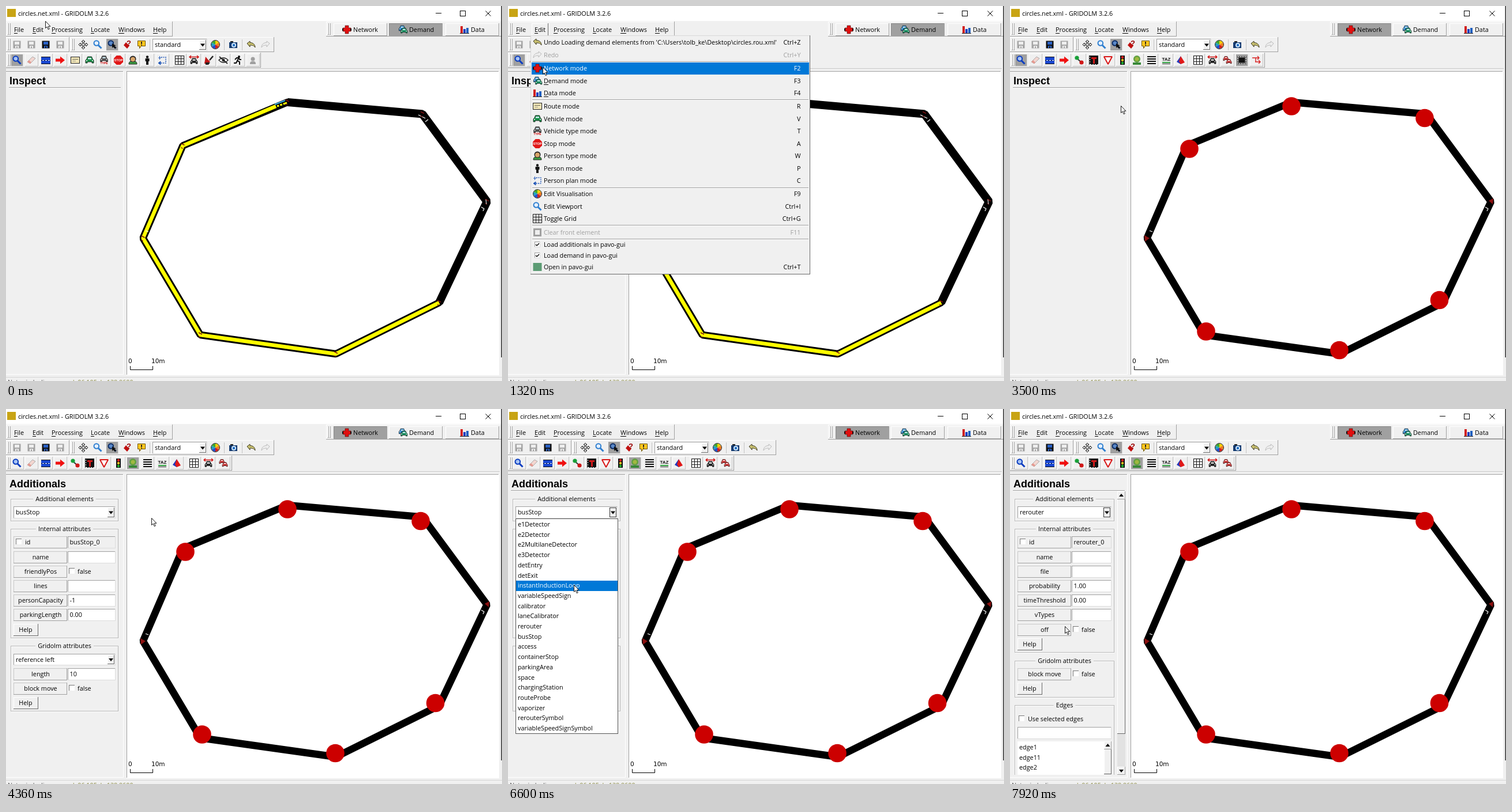
Write an HTML page with a canvas that moves like this. It is 860 px wide and 651 px high and loops after 8 s.

```html
<!DOCTYPE html>
<html lang="en">
<head>
<meta charset="utf-8">
<title>Road editor</title>
<style>
html, body { margin: 0; width: 100%; height: 100%; overflow: hidden; background: #f0f0f0; }
canvas { display: block; }
</style>
</head>
<body>
<canvas id="stage" width="860" height="651"></canvas>
<script>
const g = document.getElementById('stage').getContext('2d');
const FACE = '#f0f0f0', SHADE = '#a0a0a0', BLUE = '#0078d7', RED = '#cc0000';
const UI = '10.8px "Open Sans", "Noto Sans", sans-serif';
const HEAD = 'bold 18px "Liberation Sans", Arial, sans-serif';
const TINY = 'bold 5.5px "Liberation Sans", Arial, sans-serif';

// Drawing helpers
function rect(x, y, w, h, c) { g.fillStyle = c; g.fillRect(x, y, w, h); }
function box(x, y, w, h, light, dark, fill) {
  if (fill) rect(x, y, w, h, fill);
  rect(x, y, w, 1, light); rect(x, y, 1, h, light);
  rect(x, y + h - 1, w, 1, dark); rect(x + w - 1, y, 1, h, dark);
}
const raised = (x, y, w, h, fill = FACE) => box(x, y, w, h, '#fff', SHADE, fill);
const sunken = (x, y, w, h, fill = '#fff') => box(x, y, w, h, SHADE, '#dcdcdc', fill);
function path(d, fill, stroke, width = 1) {
  const p = new Path2D(d);
  if (fill) { g.fillStyle = fill; g.fill(p); }
  if (stroke) { g.strokeStyle = stroke; g.lineWidth = width; g.stroke(p); }
}
function dot(x, y, r, c) { g.fillStyle = c; g.beginPath(); g.arc(x, y, r, 0, 7); g.fill(); }
function text(s, x, y, c = '#000', align = 'left', font = UI) {
  g.font = font; g.fillStyle = c; g.textAlign = align; g.fillText(s, x, y);
}
function hotText(s, x, y, c = '#000') {
  text(s, x, y, c);
  rect(x, y + 2, Math.round(g.measureText(s[0]).width), 1, c);
}
function line(points, c, width, closed) {
  g.beginPath();
  points.forEach(p => g.lineTo(...p));
  if (closed) g.closePath();
  g.strokeStyle = c; g.lineWidth = width; g.stroke();
}

// Icons, each centred on 0,0
function disk(c, inner) {
  path('M-6.5-6.5h13v13h-13z', c);
  rect(-4, -5, 8, 5, inner); rect(-3, 2, 6, 4, inner); rect(-1, 3, 2, 3, c);
}
function lens(c, glass = '#e4f0ff') {
  path('M1 1L6.500 6.500', 0, c, 3);
  path('M-6.500-2.500a4.300 4.300 0 1 0 8.600 0a4.300 4.300 0 1 0-8.600 0', glass, c, 2);
}
function car(c, glass = '#cfe8f0') {
  path('M-7 5V0l2-2 1.5-4h7L5-2l2 2v5h-3V3h-8v2z', c, '#111', .8);
  rect(-3, -4, 6, 2.5, glass); rect(-6, 0, 2, 1.5, '#fff'); rect(4, 0, 2, 1.5, '#fff');
}
function bentArrow(c, edge) { path('M-7-2l5-4v2.5c6 0 9 4 9 8.500c-2-3-4-4-9-4v3z', c, edge); }
function man(c) {
  dot(0, -5.5, 2.2, c);
  path('M-3.500-3h7v5h-1.500v6h-4v-6h-1.500z', c);
}
const icons = {
  saveOff() { disk('#a5a5a5', '#eee'); },
  save() { disk('#111', '#2a62c8'); },
  move() { path('M0-8l3 3h-2v4h4v-2l3 3-3 3v-2H1v4h2L0 8l-3-3h2V1h-4v2l-3-3 3-3v2h4v-4h-2z', '#fff', '#111'); },
  zoom() { lens('#2f7fd0'); },
  inspect() { lens('#0a3cc0', '#a8c4f4'); },
  locate() { lens('#0c2c64', '#5a88c8'); path('M0-2v8l2-2 3 3 2-2-3-3h3z', '#111'); },
  help() { path('M-6 1l4-5 3 3 3 3-4 5z', '#c01010'); text('?', 3, 2, '#900', 'center', 'bold 13px "Liberation Sans", sans-serif'); },
  note() {
    path('M-6.500-6.500h13v9h-7l-3 4v-4h-3z', '#ffc81e', '#6b5200');
    rect(-1, -5, 2, 4, '#222'); rect(-1, 0, 2, 1.5, '#222');
  },
  wheel() {
    ['#f5d000', '#f08020', '#d02020', '#2050d0', '#20a0c0', '#40a830'].forEach((c, i) => {
      g.fillStyle = c; g.beginPath(); g.moveTo(0, 0);
      g.arc(0, 0, 7, i * Math.PI / 3 - 1.57, (i + 1) * Math.PI / 3 - 1.57); g.fill();
    });
    path('M-7.500 0a7.500 7.500 0 1 0 15 0a7.500 7.500 0 1 0-15 0', 0, '#222');
  },
  camera() { rect(-7, -4, 14, 10, '#123a70'); rect(-5, -6, 5, 2, '#222'); dot(1, 1, 4, '#d8ecff'); dot(1, 1, 2.2, '#1c6cc0'); },
  undo() { bentArrow('#c8c070', '#3c3820'); },
  redo() { g.scale(-1, 1); bentArrow('#eee', '#bbb'); },
  eraser() { path('M-7 3L2-6l5 3-9 9z', '#f2d6d0', '#aaa'); path('M-7 3l3-3 4 4-2 2z', '#e89a90'); },
  select() {
    rect(-8, -6, 16, 13, '#111'); rect(-8, -5, 16, 5, '#1846d0'); rect(-8, 1, 16, 5, '#1846d0');
    for (let i = -6; i < 7; i += 5) rect(i, 0, 3, 1, '#fff');
  },
  arrow() { path('M-8-2.500h8v-4L8 0 0 6.500v-4h-8z', '#f01010'); },
  route() { rect(-8, -6, 16, 12, '#222'); rect(-7, -5, 14, 10, '#f2e6b8'); rect(-5, -2, 10, 1, '#665'); rect(-5, 1, 6, 1, '#998'); },
  car() { car('#189048'); },
  type() { g.scale(.9, .9); g.translate(0, -2); car('#555'); text('TYPE', 0, 10, '#c00', 'center', TINY); },
  stop() { path('M-3.300-8h6.600L8-3.300v6.600L3.300 8h-6.600L-8 3.300v-6.600z', '#e01818'); text('STOP', 0, 2, '#fff', 'center', TINY); },
  face() { path('M-7 7c0-5 3-5 7-5s7 0 7 5z', '#3a9a40', '#222'); dot(0, -2, 5.5, '#222'); dot(0, -1.5, 4, '#d8a468'); },
  man() { man('#111'); },
  plan() {
    g.setLineDash([2, 1.5]); path('M-2-5H6V5H-6', 0, '#2358b8', 1.5); g.setLineDash([]);
    path('M-7-4h5M-4.500-7v6M-7 5l4-3v6z', '#2358b8', '#2358b8');
  },
  grid() { path('M-7.500-7.500h15v15h-15zM-2.500-7.500v15M2.500-7.500v15M-7.500-2.500h15M-7.500 2.500h15', '#fff', '#222', 1.2); },
  spread() { path('M-8-5.500H8M-5-8l-3 2.500 3 2.500M5-8l3 2.500L5-3', 0, '#d01010', 1.4); g.translate(0, 2); g.scale(.85, .85); car('#222', '#fff'); },
  brush() { path('M7-7L1 0', 0, '#222', 2.5); path('M-6-6l5 6 3 2-5 5-5-1z', '#c01818'); path('M-6 4h8l-3 4h-5z', '#222'); },
  eye() { path('M-8 0q8-8 16 0q-8 8-16 0z', '#fff', '#222', 1.4); dot(0, 0, 2.5, '#222'); path('M-7-6L7 6', 0, '#222', 1.8); },
  run() { dot(2, -6, 2, '#111'); path('M-5-1l3-3h4l1 3h3M1-3l-2 4 4 2v5M-1 1l-2 4h-4', 0, '#111', 2); },
  manOff() { path('M-5 7c0-5 2-5 5-5s5 0 5 5z', SHADE); dot(0, -2, 3.5, SHADE); },
  connect() { path('M-5-4L5 5', 0, '#333', 2); dot(-4, -4, 3.6, '#18a038'); dot(4, 4, 3.6, '#d01818'); },
  signal() {
    rect(-8, -8, 16, 16, '#111'); rect(-4, -5, 9, 3, '#d01818'); rect(-1, -2, 3, 8, '#d01818');
    for (let i = -6; i < 8; i += 4) { rect(-7, i, 1, 2, '#fff'); rect(i, 7, 2, 1, '#ddd'); }
  },
  yield() { path('M-7-6H7L0 7z', '#fff', '#d81818', 2); },
  lights() { rect(-4, -8, 8, 16, '#111'); dot(0, -5, 2.2, '#e02020'); dot(0, 0, 2.2, '#f0c020'); dot(0, 5, 2.2, '#20b030'); },
  sign() { dot(0, -2, 6, '#60a040'); dot(0, -2, 3.5, '#a0b840'); rect(-7, 4, 14, 4, '#388838'); },
  zebra() { for (let i = -7; i < 8; i += 4) rect(-7, i, 15, 2, '#111'); },
  zone() { text('TAZ', 0, 1, '#111', 'center', 'bold 8px "Liberation Sans", sans-serif'); rect(-7, 3, 14, 2, '#30a040'); rect(-7, 6, 14, 1, '#222'); },
  shape() { path('M-7 3L0-7V7z', '#2038c0'); path('M0-7L7 4 0 7-3 2z', '#e01818'); },
  chain() { g.scale(.65, .65); g.translate(-4, -4); car('#c01818', '#fff'); g.translate(8, 8); car('#c01818', '#fff'); },
  frame() { rect(-8, -7, 16, 14, '#555'); g.setLineDash([2, 2]); path('M-7-6H7V6H-7z', 0, '#fff'); g.setLineDash([]); rect(-5, -4, 10, 8, '#111'); },
  lanes() { path('M-7-4H4M-2 3H7M2-7l3 3-3 3M4 0l3 3-3 3M-1-4v7', 0, '#d82020', 1.4); },
  network() { path('M-3-7h6v4h4v6H3v4h-6V3h-4v-6h4z', '#e01010', '#400', .6); rect(-8, -2, 2, 4, '#111'); rect(6, -2, 2, 4, '#111'); },
  demand() { g.translate(-1, -2); g.scale(.8, .8); car('#2080c8'); g.translate(4, 5); car('#189060'); },
  data() { rect(-7, -6, 4, 13, '#d02020'); rect(-2, -1, 4, 8, '#2040c0'); rect(3, -3, 4, 10, '#2060c0'); rect(-8, 6, 16, 1, '#222'); },
  blank() { rect(-7, -7, 14, 14, SHADE); rect(-4, -4, 8, 8, '#eee'); },
  app() { rect(-7.5, -7, 15, 14, '#5c9c74'); },
  check() { sunken(-5, -5, 10, 10); path('M-3 0l2 2 4-4', 0, '#111', 1.6); }
};
function icon(name, x, y) { g.save(); g.translate(x, y); icons[name](); g.restore(); }

// Window chrome
const names = s => s.split(' ');
const demandTools = names('inspect eraser select arrow route car type stop face man plan');
const demandExtra = names('grid spread brush eye run manOff');
const netTools = names('inspect eraser select arrow connect signal yield lights sign zebra zone shape');
const netExtra = names('grid spread chain frame lanes');

function grip(x, y) { for (const d of [0, 3]) raised(x + d, y + 3, 2, 20); }
function bar(x, y, w) { raised(x, y, w, 26); grip(x + 3, y); }
function tool(name, x, y, on, flat) {
  if (on) sunken(x - 10, y - 10, 21, 21, SHADE);
  else if (!flat) box(x - 11, y - 11, 23, 22, '#fafafa', '#c4c4c4');
  icon(name, x, y);
}
function combo(x, y, w, h, label, pressed) {
  sunken(x, y, w, h);
  text(label, x + 4, y + 14);
  const bx = x + w - 14, mid = y + h / 2;
  box(bx, y + 2, 12, h - 4, pressed ? '#333' : '#fff', pressed ? '#333' : '#696969', FACE);
  path(`M${bx + 2} ${mid - 2}h8l-4 5z`, '#000');
}
function chrome(demand, extras, selected, hover) {
  rect(0, 0, 860, 651, FACE);
  rect(0, 0, 860, 26, '#fff');
  rect(2, 5, 15, 14, '#c8a415');
  text('circles.net.xml - GRIDOLM 3.2.6', 21, 17);
  rect(745, 12, 10, 1, '#000');
  box(787, 8, 10, 10, '#000', '#000');
  path('M831.500 8.500l9 9M840.500 8.500l-9 9', 0, '#000');

  bar(0, 27, 289); bar(0, 54, 110); bar(111, 54, 354);
  bar(0, 81, extras < 5 ? 392 : 442);
  raised(555, 27, 305, 26); grip(558, 27);
  if (hover) box(41, 30, 29, 22, '#fff', '#696969', FACE);
  [['File', 14], ['Edit', 46], ['Processing', 79], ['Locate', 147], ['Windows', 195], ['Help', 255]]
    .forEach(([s, x]) => hotText(s, x, 45));

  ['network', 'demand', 'data'].forEach((mode, i) => {
    const x = [568, 664, 762][i], on = i == (demand ? 1 : 0);
    box(x, 30, 93, 22, on ? '#888' : '#fff', SHADE, on ? SHADE : FACE);
    icon(mode, [591, 688, 795][i], 41);
    text(['Network', 'Demand', 'Data'][i], [602, 699, 806][i], 45);
  });

  names('saveOff saveOff save saveOff').forEach((n, i) => tool(n, 19 + i * 25, 67, false, true));
  names('move zoom locate help note').forEach((n, i) => tool(n, Math.round(134 + i * 25.2), 67, i == 2, true));
  combo(254, 57, 95, 21, 'standard');
  [['wheel', 363], ['camera', 394], ['undo', 425], ['redo', 450]].forEach(([n, x]) => icon(n, x, 67));
  for (const x of [249, 378, 409]) rect(x, 58, 1, 19, '#c4c4c4');
  (demand ? demandTools : netTools).forEach((n, i) => tool(n, Math.round(19 + i * 25.15), 94, i == selected));
  (demand ? demandExtra : netExtra).slice(0, extras).forEach((n, i) =>
    tool(n, Math.round((demand ? 301 : 326) + i * 25.3), 94, n == 'frame'));

  rect(0, 108, 856, 1, '#c8c8c8');
  box(-1, 113, 205, 527, SHADE, '#fff');
  box(209, 113, 646, 528, SHADE, '#fff', '#fff');
  rect(0, 644, 860, 1, '#d4d4d4');
  text('Net   circle  lines', 3, 657, '#555');
  text('d: 06,105  k: 138,9600', 112, 657, '#8c8c48');
  rect(858.5, 0, 1.5, 610, '#333');
}

// Road ring
const ring = [[488, 167], [722, 187.500], [834, 339.500], [751, 515], [572, 604], [337, 571], [237.500, 403], [306.500, 242.500]];
const junctions = [[488, 174], [719, 194.500], [744.500, 510.500], [571, 597.500], [340, 565], [311, 248]];

function roads(demand) {
  g.lineJoin = 'bevel';
  line(ring, '#000', 12.500, true);
  if (demand) {
    line(ring.slice(0, 4), '#000', 14);
    line([...ring.slice(3), [468, 174]], '#ff0', 6.500);
    path('M466 171l18-7', 0, '#3ab0e8', 2);
    path('M470 174l17-6', 0, '#ff0', 3);
    path('M473 170l3 6M479 168l2 6', 0, '#000', 2);
    path('M715 189l12 6M727 201l5-4', 0, '#fff', 1.2);
    ring.forEach(([x, y]) => path(`M${x - 3} ${y - 4}l6 3M${x - 3} ${y + 3}l3 2`, 0, '#7a1010', 1.5));
    path('M832 336l1 8', 0, '#fff');
  } else {
    junctions.forEach(([x, y]) => dot(x, y, 15.800, RED));
    path('M233 398l9 5-8 6z', '#8c1010');
    path('M838 334l-8 4 7 6z', '#8c1010');
  }
  path('M824 349l5 3-2 4M242 390l5 2', 0, '#fff', 1.2);
  const font = '10.5px "DejaVu Sans", sans-serif';
  text('0', 212, 620, '#000', 'left', font);
  text('10m', 252, 620, '#000', 'left', font);
  path('M215.500 625v6.500h39V625', 0, '#000');
}

// Edit menu: icon, label, shortcut, baseline
const menu = [
  ['undo', "Undo Loading demand elements from 'C:\\Users\\tolb_ke\\Desktop\\circles.rou.xml'", 'Ctrl+Z', 67],
  ['redo', 'Redo', 'Ctrl+Y', 89], ['network', 'Network mode', 'F2', 112], ['demand', 'Demand mode', 'F3', 134],
  ['data', 'Data mode', 'F4', 155], ['route', 'Route mode', 'R', 178], ['car', 'Vehicle mode', 'V', 200],
  ['type', 'Vehicle type mode', 'T', 221], ['stop', 'Stop mode', 'A', 243], ['face', 'Person type mode', 'W', 264],
  ['man', 'Person mode', 'P', 286], ['plan', 'Person plan mode', 'C', 307], ['wheel', 'Edit Visualisation', 'F9', 330],
  ['zoom', 'Edit Viewport', 'Ctrl+I', 352], ['grid', 'Toggle Grid', 'Ctrl+G', 373],
  ['blank', 'Clear front element', 'F11', 397], ['check', 'Load additionals in pavo-gui', '', 418],
  ['check', 'Load demand in pavo-gui', '', 437], ['app', 'Open in pavo-gui', 'Ctrl+T', 457]
];
function editMenu(hot) {
  box(39, 51, 485, 415, '#d8d8d8', '#696969', FACE);
  for (const y of [96, 162, 315, 380, 404]) { rect(42, y, 479, 1, SHADE); rect(42, y + 1, 479, 1, '#fff'); }
  menu.forEach(([pic, label, key, y], i) => {
    const c = i == hot ? '#fff' : i == 1 || i == 15 ? SHADE : '#000';
    if (i == hot) rect(41, y - 14, 481, 21, BLUE);
    icon(pic, 51, y - 4);
    (i > 1 && i < 5 ? hotText : text)(label, 62, y, c);
    text(key, 507.500, y, c, 'right');
  });
}

// Side panel
function heading(s) {
  text(s, 6, 136, '#000', 'left', HEAD);
  rect(5, 141, 194, 1, SHADE); rect(5, 142, 194, 1, '#fff');
}
function group(label, y, bottom, right) {
  const mid = (9 + right) / 2;
  box(9, y + 1, right - 8, bottom - y, '#fff', '#fff');
  box(8, y, right - 7, bottom - y, '#b8b8b8', '#b8b8b8');
  g.font = UI;
  const w = g.measureText(label).width + 8;
  rect(mid - w / 2, y - 2, w, 5, FACE);
  text(label, mid, y + 4, '#000', 'center');
}
function tick(x, y) { box(x, y, 11, 11, '#777', '#eee', '#fff'); }
// A value of false becomes a check box
function row(label, value, y, right) {
  box(13, y, 93, 21, '#c8c8c8', SHADE, FACE);
  if (label == 'id') { tick(17, y + 4); text(label, 33, y + 14); }
  else text(label, 60, y + 14, '#000', 'center');
  if (value === false) { tick(109, y + 4); text('false', 124, y + 14); return; }
  sunken(107, y, right - 106, 21, label == 'id' ? FACE : '#fff');
  text(value, 110.500, y + 14);
}
function rows(list, y, right) {
  list.forEach(([label, value], i) => row(label, value, Math.round(y + i * 25.2), right));
  const by = Math.round(y + list.length * 25.2);
  box(13, by, 43, 21, '#fff', '#696969', FACE);
  text('Help', 34, by + 14, '#000', 'center');
}
function busPanel(label, pressed) {
  heading('Additionals');
  group('Additional elements', 156, 195, 194);
  combo(13, 169, 177, 21, label, pressed);
  group('Internal attributes', 208, 398, 194);
  rows([['id', 'busStop_0'], ['name', ''], ['friendlyPos', false], ['lines', ''],
    ['personCapacity', '-1'], ['parkingLength', '0.00']], 221.400, 189);
  group('Gridolm attributes', 411, 525, 194);
  combo(13, 425, 177, 20, 'reference left');
  rows([['length', '10'], ['block move', false]], 450, 189);
}
function scrollBar(x, y, w, h, thumb, down) {
  rect(x, y, w, h, '#e2e2e2');
  const mid = x + w / 2;
  box(x, y, w, thumb, '#fff', '#696969', FACE);
  box(x, y, w, 14, '#fff', SHADE);
  path(`M${mid - 4} ${y + 9}h8l-4-5z`, '#000');
  if (!down) return;
  box(x, y + h - 14, w, 14, '#fff', SHADE, FACE);
  path(`M${mid - 4} ${y + h - 9}h8l-4 5z`, '#000');
}
function reroutePanel() {
  heading('Additionals');
  group('Additional elements', 156, 195, 180);
  combo(13, 169, 163, 21, 'rerouter', true);
  group('Internal attributes', 208, 423, 180);
  rows([['id', 'rerouter_0'], ['name', ''], ['file', ''], ['probability', '1.00'],
    ['timeThreshold', '0.00'], ['vTypes', ''], ['off', false]], 221.400, 175);
  group('Gridolm attributes', 437, 501, 180);
  rows([['block move', false]], 450, 175);
  group('Edges', 514, 637, 180);
  rect(8, 635, 175, 3, FACE);
  tick(15, 532); text('Use selected edges', 31, 542);
  sunken(13, 552, 163, 21);
  rect(13, 577, 163, 58, '#fff');
  ['edge1', 'edge11', 'edge2'].forEach((s, i) => text(s, 16, 591 + i * 17.700));
  scrollBar(163, 577, 13, 58, 57);
  scrollBar(186, 143, 14, 492, 421, true);
}
const kinds = names('e1Detector e2Detector e2MultilaneDetector e3Detector detEntry detExit instantInductionLoop ' +
  'variableSpeedSign calibrator laneCalibrator rerouter busStop access containerStop parkingArea space ' +
  'chargingStation routeProbe vaporizer rerouterSymbol variableSpeedSignSymbol');
function kindList(hot) {
  box(13, 190, 178, 374, '#555', '#555', '#fff');
  kinds.forEach((s, i) => {
    const y = i * 17.700;
    if (i == hot) rect(14, Math.round(191.300 + y), 176, 18, BLUE);
    text(s, 17, Math.round(204 + y), i == hot ? '#fff' : '#000');
  });
}

// Start time, pointer x, y, view, highlighted entry
const steps = [
  [0, 68, 26, 'demand'], [420, 57, 36, 'hover'], [870, 57, 45, 'menu', -1], [1320, 60, 106, 'menu', 2],
  [2200, 60, 107, 'inspect'], [3500, 192, 173, 'inspect'], [3930, 252, 189, 'inspect'],
  [4360, 252, 189, 'bus'], [4830, 177, 174, 'bus'], [5250, 178, 175, 'bus'],
  [5680, 180, 178, 'list', 11], [6150, 124, 287, 'list', 5], [6600, 114, 305, 'list', 6],
  [7030, 106, 376, 'list', 10], [7460, 95, 377, 'picked', 10], [7920, 95, 377, 'rerouter']
];
function draw(now) {
  const t = now % 8000;
  const [, x, y, view, hot] = steps.findLast(s => s[0] <= t);
  const demand = ['demand', 'hover', 'menu'].includes(view);
  const inspect = demand || view == 'inspect';
  chrome(demand, demand ? 6 : inspect ? 5 : 3, inspect ? 0 : 8, view == 'hover' || view == 'menu');
  roads(demand);
  if (inspect) heading('Inspect');
  else if (view == 'rerouter') reroutePanel();
  else busPanel(view == 'picked' ? 'rerouter' : 'busStop', view != 'bus');
  if (view == 'menu') editMenu(hot);
  if (view == 'list' || view == 'picked') kindList(hot);
  path(`M${x + .5} ${y + .5}v12l2.700-2.500 2 4.700 2-.900-2-4.500h3.700z`, '#fff', '#000', .9);
  requestAnimationFrame(draw);
}
requestAnimationFrame(draw);
</script>
</body>
</html>
```
